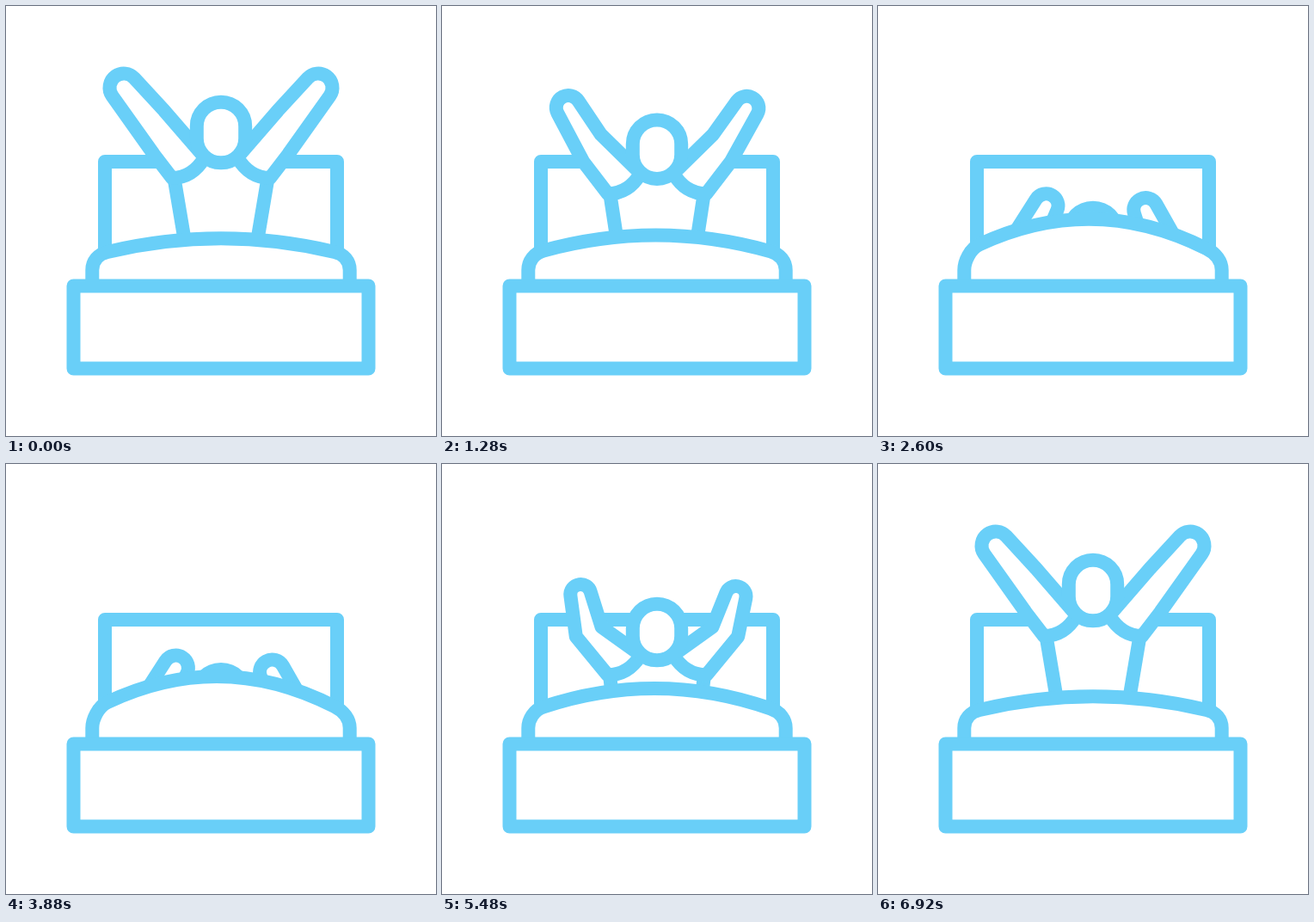
An HTML page with a canvas for the animation above (8 s loop, 500 px wide and 500 px high).

```html
<!DOCTYPE html>
<html lang="en">
<head>
<meta charset="utf-8">
<title>Waking up</title>
<style>
html, body { margin: 0; width: 100%; height: 100%; overflow: hidden; background: #fff; }
canvas { display: block; width: 500px; height: 500px; }
</style>
</head>
<body>
<canvas id="stage"></canvas>
<script>
const LOOP = 8000, STEP = 40, MOVE = 3120, DOWN = 120, UP = 3840;
const BLUE = '#69cff8', WHITE = '#fff';

const canvas = document.getElementById('stage');
const ctx = canvas.getContext('2d');
const dpr = window.devicePixelRatio || 1;
canvas.width = canvas.height = 500 * dpr;

const lerp = (a, b, p) => a + (b - a) * p;
const mix = (a, b, p) => [lerp(a[0], b[0], p), lerp(a[1], b[1], p)];
const quad = (a, b, c, p) => a + b * p + c * p * p;

// cubic-bezier(.75, 0, .25, 1)
function ease(x) {
  if (x <= 0) return 0;
  if (x >= 1) return 1;
  let lo = 0, hi = 1, s = 0.5;
  for (let i = 0; i < 30; i++) {
    s = (lo + hi) / 2;
    const bx = 2.25 * s * (1 - s) ** 2 + 0.75 * s * s * (1 - s) + s ** 3;
    if (bx < x) lo = s; else hi = s;
  }
  return s * s * (3 - 2 * s);
}

// 0 = arms stretched, 1 = under the blanket
function sleepiness(t) {
  return t < UP ? ease((t - DOWN) / MOVE) : 1 - ease((t - UP) / MOVE);
}

function paint() {
  ctx.fill();
  ctx.stroke();
}

function mirrored(draw) {
  ctx.save();
  ctx.translate(500, 0);
  ctx.scale(-1, 1);
  draw();
  ctx.restore();
}

function drawHeadboard() {
  ctx.beginPath();
  ctx.moveTo(115, 310);
  ctx.lineTo(115, 181);
  ctx.lineTo(385, 181);
  ctx.lineTo(385, 310);
  ctx.stroke();
}

// Angle of the point where a line from e touches the circle around c
function tangent(c, r, e, side) {
  const dx = e[0] - c[0], dy = e[1] - c[1];
  return Math.atan2(dy, dx) + side * Math.acos(Math.min(1, r / Math.hypot(dx, dy)));
}

function joints(p) {
  return {
    pit: mix([193, 200], [192, 313], p),
    shoulder: mix([231, 176], [231, 291], p),
    hip: mix([209, 280], [186, 300], p)
  };
}

function drawTorso(p) {
  const { pit, shoulder, hip } = joints(p);
  const x = pit[0] + 2.5;
  ctx.beginPath();
  ctx.moveTo(hip[0], hip[1]);
  ctx.lineTo(x, pit[1]);
  ctx.lineTo(shoulder[0], shoulder[1]);
  ctx.lineTo(500 - shoulder[0], shoulder[1]);
  ctx.lineTo(500 - x, pit[1]);
  ctx.lineTo(500 - hip[0], hip[1]);
  ctx.fill();
  const side = () => {
    ctx.beginPath();
    ctx.moveTo(x, pit[1]);
    ctx.lineTo(hip[0], hip[1]);
    ctx.stroke();
  };
  side();
  mirrored(side);
}

function drawArm(p, rest) {
  const { pit, shoulder } = joints(p);
  const hand = mix([137, 95], rest, p);
  const r = quad(16.5, -17.6, 15.5, p);
  const outer = [quad(171.5, -50, 27, p), quad(172, 42.4, 72, p)];
  const inner = mix([184, 121.7], [188, 291], p);
  ctx.beginPath();
  ctx.moveTo(pit[0], pit[1]);
  ctx.lineTo(outer[0], outer[1]);
  ctx.arc(hand[0], hand[1], r, tangent(hand, r, outer, 1), tangent(hand, r, inner, -1));
  ctx.lineTo(inner[0], inner[1]);
  ctx.lineTo(shoulder[0], shoulder[1]);
  ctx.quadraticCurveTo(shoulder[0] - 14, pit[1], pit[0], pit[1]);
  ctx.closePath();
  paint();
}

function drawHead(p) {
  const top = lerp(111.7, 239, p), bottom = lerp(182.3, 297, p);
  ctx.beginPath();
  ctx.arc(250, top + 28.2, 28.2, Math.PI, 0);
  ctx.arc(250, bottom - 28.2, 28.2, 0, Math.PI);
  ctx.closePath();
  paint();
}

function drawBlanket(p) {
  const left = lerp(286, 277, p), right = lerp(286, 282, p), peak = lerp(254.6, 214.5, p);
  const bend = y => y + 11 * (y - peak) / 132;
  ctx.beginPath();
  ctx.moveTo(100.3, 325);
  ctx.lineTo(100.3, 307);
  ctx.bezierCurveTo(100.3, 297, 107, bend(left), 118, left);
  ctx.quadraticCurveTo(250, peak, 382, right);
  ctx.bezierCurveTo(393, bend(right), 399.7, 297, 399.7, 307);
  ctx.lineTo(399.7, 325);
  paint();
}

function drawBase() {
  ctx.beginPath();
  ctx.rect(78.5, 325.5, 343, 96);
  paint();
}

function render(t) {
  const p = sleepiness(t);
  ctx.setTransform(dpr, 0, 0, dpr, 0, 0);
  ctx.fillStyle = WHITE;
  ctx.fillRect(0, 0, 500, 500);
  ctx.strokeStyle = BLUE;
  ctx.lineWidth = 16;
  ctx.lineJoin = 'round';
  drawHeadboard();
  drawTorso(p);
  drawArm(p, [197.5, 237]);
  mirrored(() => drawArm(p, [190.5, 242]));
  drawHead(p);
  drawBlanket(p);
  drawBase();
}

const start = performance.now();
function loop() {
  const t = (performance.now() - start) % LOOP;
  render(Math.floor(t / STEP) * STEP);
  requestAnimationFrame(loop);
}
loop();
</script>
</body>
</html>
```
